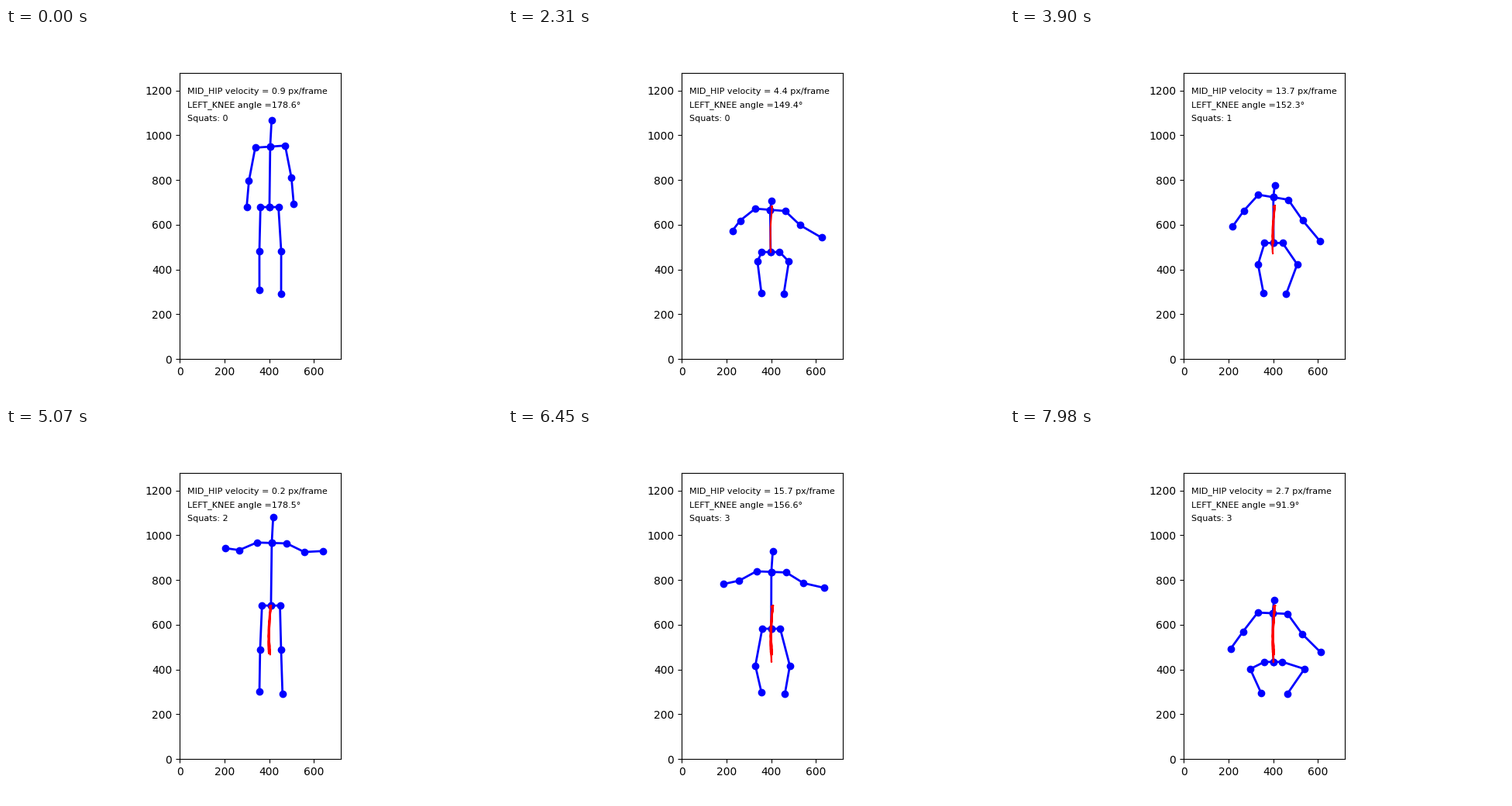
A matplotlib script that plays this animation: 640x480 px, repeating every 8000 ms.

```python
import numpy as np
import matplotlib.pyplot as plt
from matplotlib.animation import FuncAnimation

STEP = 30
COUNT = 267
SCALE = 369.6 / 1280
LEFT, GROUND = 224.05, 427.45
SHOULDER, HIP = 19.3, 11.6


def pose(hip=(0, 0), torso=0, head=0, tilt=0, skew=0, elbow=(0, 0),
         wrist=(0, 0), knees=(0, 0), knee_y=0, foot=0):
    """Pixels; arms are mirrored offsets from the neck, knees from the hip."""
    return np.array([*hip, torso, head, tilt, skew, *elbow, *wrist,
                     *knees, knee_y, foot], float)


hang = pose((340, 231.3), 77.8, 34, -1.2, 0, (27.5, 42.2), (30.5, 75.7),
            (-13, 15), 288, 338.5)
tall = pose((342, 229.3), 80.8, 33, 0.6, 3, (42, 10.5), (63, 8.5),
            (-14, 13), 286.4, 340.5)
low = pose((339, 291.3), 53.5, 11, 1.4, 9, (38.5, 17.5), (57, 32),
           (-17, 24), 301, 342.5)
crouch = pose((340.8, 292.8), 52.2, 9.3, 4, 4.3, (35.8, 31), (50.3, 64),
              (-22, 36), 301.3, 342.5)
deep = pose((340, 302.2), 62.8, 17, 0.8, 4, (38.5, 25.5), (58, 48),
            (-30, 40), 311, 342.5)
# how far the path bows out halfway between standing and the bottom
bow = pose((-1.5, 0), elbow=(1, -4), wrist=(4, -7), knee_y=11)

# time of the bottom, time to get there, pose at the bottom
REPS = [(2405, 790, low), (4110, 645, crouch),
        (6034, 746, deep), (8000, 750, deep)]

times = np.arange(COUNT) * STEP


def mix(a, b, w):
    w = w[:, None]
    return a * (1 - w) + b * w


def motion():
    lift = np.interp(times, [0, 1320, 2400], [0, 0.18, 1])
    body = mix(hang, tall, lift)
    for bottom, half, squat in REPS:
        phase = np.clip(np.abs(times - bottom) / half, 0, 1)
        w = (1 + np.cos(np.pi * phase)) / 2
        body = mix(body, squat, w) + bow * np.sin(np.pi * w)[:, None]
    return body + np.random.default_rng(4).normal(0, 0.1, body.shape)


def limbs(k):
    """Chains of joints: spine, arms, legs."""
    hip, (torso, head, tilt, skew) = body[k, :2], body[k, 2:6]
    elbow, wrist = body[k, 6:8], body[k, 8:10]
    knees, knee_y, foot = body[k, 10:12], body[k, 12], body[k, 13]
    depth = (hip[1] - 229.3) / 73
    neck = hip + [1 - 2 * depth, -torso]
    nose = neck + [1.8, -head]

    def arm(side):
        out = np.array([[SHOULDER, 0], elbow, wrist])
        out[:, 0] *= side
        out[2, 0] += skew
        out[:, 1] += out[:, 0] * tilt / SHOULDER
        return list(neck + out)

    side = np.array([HIP, 0])
    r_knee, l_knee = [(hip[0] + x, knee_y) for x in knees]
    r_foot = 327 - 0.4 * max(0, 317 - r_knee[0]), foot
    l_foot = 355 + times[k] * 0.00035, 343.4
    return ([nose, neck, hip],
            [*arm(-1)[::-1], neck, *arm(1)],
            [r_foot, r_knee, hip - side, hip, hip + side, l_knee, l_foot])


def bend(a, b, c):
    """Angle at b in degrees."""
    u, v = np.subtract(a, b), np.subtract(c, b)
    cos = u @ v / np.hypot(*u) / np.hypot(*v)
    return np.degrees(np.arccos(np.clip(cos, -1, 1)))


def to_data(points):
    x, y = np.asarray(points, float).T
    return (x - LEFT) / SCALE, (GROUND - y) / SCALE


body = motion()
hips = body[:, :2]
speed = np.hypot(*np.gradient(hips, axis=0).T) / SCALE

fig, ax = plt.subplots(figsize=(6.4, 4.8), dpi=100)
ax.set(xlim=(0, 720), ylim=(0, 1280), aspect="equal")
chains = [ax.plot([], [], "bo-", lw=2, ms=6)[0] for _ in range(3)]
trail, = ax.plot([], [], "r-", lw=1.5, zorder=3)
labels = [ax.text(0.05, 0.928 - 0.049 * i, "", fontsize=8,
                  transform=ax.transAxes) for i in range(3)]


def draw(k):
    joints = limbs(k)
    for line, points in zip(chains, joints):
        line.set_data(*to_data(points))
    trail.set_data(*to_data(hips[:k + 1]))
    angle = bend(joints[2][2], joints[2][1], joints[2][0])
    squats = sum(times[k] > bottom + 300 for bottom, _, _ in REPS)
    labels[0].set_text(f"MID_HIP velocity = {speed[k]:.1f} px/frame")
    labels[1].set_text(f"LEFT_KNEE angle ={angle:.1f}°")
    labels[2].set_text(f"Squats: {squats}")
    return [*chains, trail, *labels]


anim = FuncAnimation(fig, draw, frames=COUNT, interval=STEP,
                     repeat=True, repeat_delay=0)
plt.show()
```
